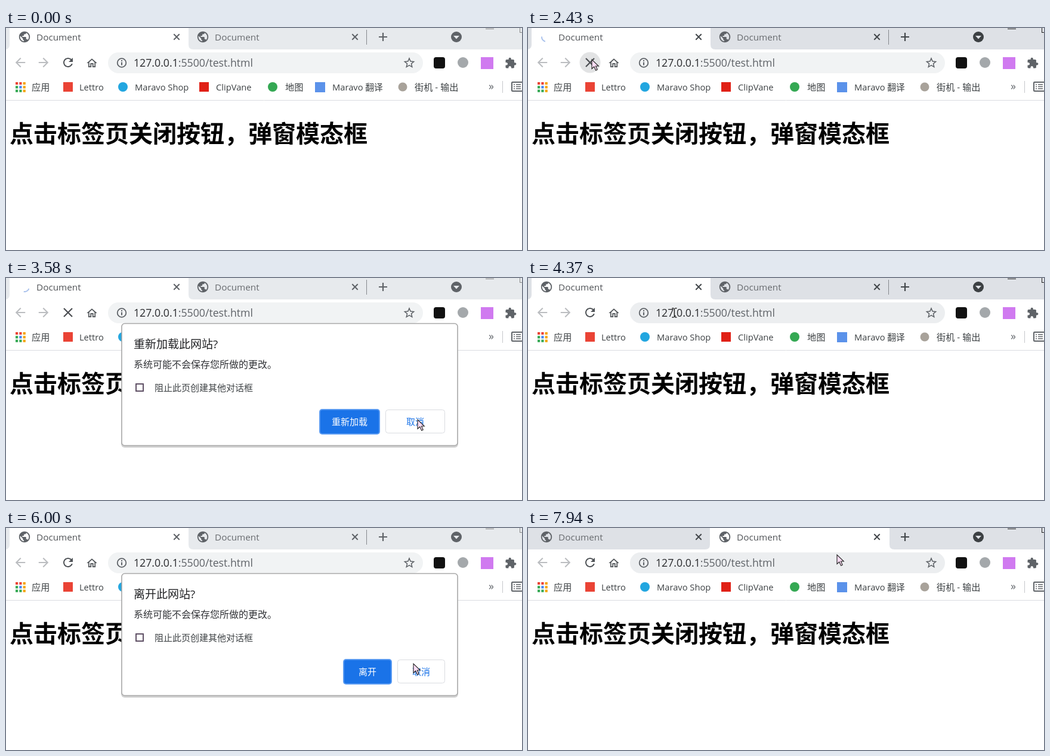
Animation, 865 px wide and 373 px high, one loop 8 s. Source, as an HTML page with a canvas:

```html
<!DOCTYPE html>
<html lang="zh-CN">
<head>
<meta charset="utf-8">
<style>
  html, body { margin: 0; width: 100%; height: 100%; overflow: hidden; background: #fff; }
  canvas { display: block; }
</style>
</head>
<body>
<canvas id="stage" width="865" height="373"></canvas>
<script>
const ctx = document.getElementById('stage').getContext('2d');
const LOOP = 8000;
const FONT = '"Open Sans", "Noto Sans CJK SC", "Noto Sans CJK", sans-serif';
const GREY = '#5f6368', BLUE = '#1a73e8';
const HEADING = '点击标签页关闭按钮\uff0c弹窗模态框';

// Icons on a 24-unit grid
const icons = {
  globe: 'M12 2C6.48 2 2 6.48 2 12s4.48 10 10 10 10-4.48 10-10S17.52 2 12 2zm-1 17.93c-3.95-.49-7-3.85-7-7.93 0-.62.08-1.21.21-1.79L9 15v1c0 1.1.9 2 2 2v1.93zm6.9-2.54c-.26-.81-1-1.39-1.9-1.39h-1v-3c0-.55-.45-1-1-1H8v-2h2c.55 0 1-.45 1-1V7h2c1.1 0 2-.9 2-2v-.41c2.93 1.19 5 4.06 5 7.41 0 2.08-.8 3.97-2.1 5.39z',
  arrow: 'M20 11H7.83l5.59-5.59L12 4l-8 8 8 8 1.41-1.41L7.83 13H20v-2z',
  reload: 'M17.65 6.35C16.2 4.9 14.21 4 12 4c-4.42 0-7.99 3.58-7.99 8s3.57 8 7.99 8c3.73 0 6.84-2.55 7.73-6h-2.08c-.82 2.33-3.04 4-5.65 4-3.31 0-6-2.69-6-6s2.69-6 6-6c1.66 0 3.14.69 4.22 1.78L13 11h7V4l-2.35 2.35z',
  home: 'M12 5.69l5 4.5V18h-2v-6H9v6H7v-7.81l5-4.5M12 3L2 12h3v8h6v-6h2v6h6v-8h3L12 3z',
  star: 'M22 9.24l-7.19-.62L12 2 9.19 8.63 2 9.24l5.46 4.73L5.82 21 12 17.27 18.18 21l-1.63-7.03L22 9.24zM12 15.4l-3.76 2.27 1-4.28-3.32-2.88 4.38-.38L12 6.1l1.71 4.04 4.38.38-3.32 2.88 1 4.28L12 15.4z',
  puzzle: 'M20.5 11H19V7c0-1.1-.9-2-2-2h-4V3.5C13 2.12 11.88 1 10.5 1S8 2.12 8 3.5V5H4c-1.1 0-1.99.9-1.99 2v3.8H3.5c1.49 0 2.7 1.21 2.7 2.7s-1.21 2.7-2.7 2.7H2V20c0 1.1.9 2 2 2h3.8v-1.5c0-1.49 1.21-2.7 2.7-2.7 1.49 0 2.7 1.21 2.7 2.7V22H17c1.1 0 2-.9 2-2v-4h1.5c1.38 0 2.5-1.12 2.5-2.5S21.88 11 20.5 11z',
  pointer: 'M0 0V15.5L3.8 12L6.7 18.2L9.2 17L6.5 11H11.3z'
};
for (const name in icons) icons[name] = new Path2D(icons[name]);

// Pointer path: time, x, y
const pointerPath = [
  [340, 562, 298], [760, 440, 110], [1100, 322, 14], [1340, 300, 30], [1640, 180, 64],
  [1960, 111, 55], [2030, 107, 53], [2820, 107, 53], [3280, 690, 238], [4120, 690, 238],
  [4370, 240, 50], [4620, 340, 28], [4930, 288, 12], [5400, 288, 12], [5720, 573, 213],
  [5930, 683, 228], [6500, 683, 228], [7240, 446, 20], [7740, 446, 20], [7940, 518, 45], [8000, 518, 45]
];

const bookmarks = [
  ['应用', 43], ['Lettro', 123], ['Maravo Shop', 216], ['ClipVane', 352],
  ['地图', 468], ['Maravo 翻译', 547], ['街机 - 输出', 685]
];

const clamp = v => Math.max(0, Math.min(1, v));
const ramp = (t, from, length) => clamp((t - from) / length);
const between = (v, a, b) => v >= a && v < b;

function pointerAt(t) {
  if (t < pointerPath[0][0]) return null;
  const i = pointerPath.findIndex(p => p[0] > t);
  const [t0, x0, y0] = pointerPath[i - 1], [t1, x1, y1] = pointerPath[i];
  const k = (t - t0) / (t1 - t0);
  return { x: x0 + (x1 - x0) * k, y: y0 + (y1 - y0) * k };
}

function text(str, x, y, size, color, weight = 400, align = 'left') {
  ctx.font = `${weight} ${size}px ${FONT}`;
  ctx.textAlign = align;
  ctx.fillStyle = color;
  ctx.fillText(str, x, y);
}
function rect(x, y, w, h, color, r = 0) {
  ctx.fillStyle = color;
  ctx.beginPath(); ctx.roundRect(x, y, w, h, r); ctx.fill();
}
function disc(x, y, r, color) {
  ctx.fillStyle = color;
  ctx.beginPath(); ctx.arc(x, y, r, 0, 7); ctx.fill();
}
function lines(color, width, ...segments) {
  ctx.strokeStyle = color; ctx.lineWidth = width;
  ctx.beginPath();
  for (const [x0, y0, x1, y1] of segments) { ctx.moveTo(x0, y0); ctx.lineTo(x1, y1); }
  ctx.stroke();
}
function box(x, y, w, h, r, color, width) {
  ctx.strokeStyle = color; ctx.lineWidth = width;
  ctx.beginPath(); ctx.roundRect(x, y, w, h, r); ctx.stroke();
}
function icon(name, x, y, scale, color, flip = 1) {
  ctx.save();
  ctx.translate(x, y); ctx.scale(scale * flip, scale); ctx.translate(-12, -12);
  ctx.fillStyle = color; ctx.fill(icons[name]);
  ctx.restore();
}
function cross(x, y, r, color, width = 2) {
  lines(color, width, [x - r, y - r, x + r, y + r], [x + r, y - r, x - r, y + r]);
}

function tabShape(x0, x1, color) {
  ctx.fillStyle = color;
  ctx.beginPath();
  ctx.moveTo(x0 - 8, 36); ctx.quadraticCurveTo(x0, 36, x0, 28);
  ctx.lineTo(x0, -2); ctx.lineTo(x1, -2); ctx.lineTo(x1, 28);
  ctx.quadraticCurveTo(x1, 36, x1 + 8, 36);
  ctx.fill();
}

function drawTabs(s) {
  const ink = s.focused ? '#43474b' : GREY;
  const strip = s.focused ? '#dee1e6' : '#e7eaed';
  rect(0, 0, 865, 36, strip);
  if (s.hoverTab === 1) tabShape(306, 605, '#f4f6f7');
  if (s.hoverTab === 0) tabShape(6, 306, '#f4f6f7');
  tabShape(...(s.tab ? [305, 606] : [6, 306]), '#fff');
  if (!s.tab && s.hoverTab !== 1) lines('#84878b', 1, [604.5, 3, 604.5, 28]);
  if (s.hoverClose) disc(286, 15, 10, '#bdc0c3');

  [0, 299].forEach((dx, i) => {
    if (i === 0 && s.loading) {
      const a = Math.PI + (s.t - 2740) * Math.PI * 2 / 1500;
      ctx.strokeStyle = '#a9c1ec'; ctx.lineWidth = 2;
      ctx.beginPath(); ctx.arc(31, 15, 8, a, a + 1.35); ctx.stroke();
    } else icon('globe', 31 + dx, 15, .92, GREY);
    text('Document', 51 + dx, 21, 15.3, i === s.tab ? '#505357' : '#686b6f');
    cross(286 + dx, 15, 4.7, ink);
  });

  lines(ink, 2.2, [625, 15, 639, 15], [632, 8, 632, 22]);
  disc(755, 15, 9, s.focused ? '#3c4043' : GREY);
  ctx.fillStyle = strip;
  ctx.beginPath(); ctx.moveTo(750, 13); ctx.lineTo(760, 13); ctx.lineTo(755, 18.5); ctx.fill();
  lines(s.focused ? '#222' : '#888', 1, [804, 1.5, 818, 1.5], [861.5, 0, 861.5, 8], [861, 7.5, 865, 7.5]);
}

function drawToolbar(s) {
  rect(0, 36, 865, 85, '#fff');
  icon('arrow', 24, 58, 1.03, '#bbbdc0');
  icon('arrow', 63, 58, 1.03, '#bbbdc0', -1);
  if (s.hoverReload) disc(104, 58, 17.5, '#e2e3e4');
  if (s.loading) cross(104, 58, 7, '#4b4e52', 2.2);
  else icon('reload', 104, 58, 1, '#505458');
  icon('home', 144, 59, .87, '#505458');

  rect(171, 41, 528, 35, s.hoverUrl ? '#eceef0' : '#f1f3f4', 17.5);
  ctx.strokeStyle = GREY; ctx.lineWidth = 1.8;
  ctx.beginPath(); ctx.arc(194, 58.5, 7.3, 0, 7); ctx.stroke();
  lines(GREY, 2, [194, 57.5, 194, 62.5], [194, 54, 194, 56]);
  text('127.0.0.1', 214, 65, 17.7, '#292a2d');
  text(':5500/test.html', 214 + ctx.measureText('127.0.0.1').width, 65, 17.7, GREY);
  icon('star', 676, 58.5, .95, GREY);

  rect(717, 49, 19, 19, '#111', 4);
  disc(766, 58, 9, '#a4a8ab');
  rect(796, 49, 21, 20, '#d07af0');
  icon('puzzle', 846, 59, .85, GREY);
}

function drawBookmarks() {
  const dots = ['#ea4335', '#ea4335', '#f4a300', '#34a853', '#4285f4', '#f4a300', '#34a853', '#34a853', '#f4a300'];
  dots.forEach((c, i) => rect(16 + i % 3 * 6.3, 91 + Math.floor(i / 3) * 6.3, 4.2, 4.2, c));
  rect(96, 91, 16, 16, '#ea4335');
  disc(196, 99, 8, '#22a6e0');
  rect(324, 91, 16, 16, '#e02016');
  disc(447, 99, 8, '#34a853');
  rect(518, 91, 17, 17, '#5b92ea');
  disc(665, 99, 7.5, '#a8a29a');
  for (const [label, x] of bookmarks) text(label, x, 105, /^[^a-z]+$/i.test(label) ? 15.2 : 14.7, '#3c4043');
  text('»', 809, 104, 18, GREY);
  lines('#c4c7ca', 1, [832.5, 89, 832.5, 109]);
  box(848, 91, 18, 15, 1, GREY, 2);
  for (const y of [95, 98.5, 102]) lines(GREY, 1.6, [851, y, 853, y], [855, y, 863, y]);
  lines('#dadce0', 1, [0, 121.5, 865, 121.5]);
}

function drawDialog(verb, alpha) {
  const wide = verb.length > 2 ? 100 : 80;
  const primary = 736 - wide * 2 - 10;
  const scale = .97 + .03 * alpha;
  ctx.save();
  ctx.globalAlpha = alpha;
  ctx.translate(475.5, 178.5); ctx.scale(scale, scale); ctx.translate(-475.5, -178.5);
  rect(193, 77, 565, 208, 'rgba(0,0,0,.18)', 6);
  rect(194, 76, 563, 206, '#fff', 5);
  box(194, 76.5, 563, 205, 5, '#a8a8a8', 1.5);
  text(verb + '此网站?', 214, 118, 19, '#202124');
  text('系统可能不会保存您所做的更改。', 214, 151, 16, '#303236');
  box(218, 178, 12, 12, 0, '#5f5065', 2);
  text('阻止此页创建其他对话框', 249, 190, 15, '#3c4043');
  rect(primary - 1, 220, wide + 2, 43, '#5a9bf2', 5);
  rect(primary + 1, 222, wide - 2, 39, BLUE, 3);
  text(verb, primary + wide / 2, 247, 15, '#fff', 500, 'center');
  box(736 - wide + .5, 221.5, wide - 1, 39, 4, '#dadce0', 1);
  text('取消', 736 - wide / 2, 247, 15, BLUE, 400, 'center');
  ctx.restore();
}

function drawPointer({ x, y }, beam) {
  ctx.save();
  ctx.translate(x, y);
  if (beam) {
    lines('#222', 1.5, [5, 1, 5, 16], [1, .8, 4, .8], [6, .8, 9, .8], [1, 16, 4, 16], [6, 16, 9, 16]);
  } else {
    ctx.fillStyle = '#fbdcf4'; ctx.fill(icons.pointer);
    ctx.strokeStyle = '#222'; ctx.lineWidth = 1.1; ctx.stroke(icons.pointer);
  }
  ctx.restore();
}

function draw(t) {
  const reloadAlpha = ramp(t, 2590, 170) * (1 - ramp(t, 3600, 160));
  const leaveAlpha = ramp(t, 5350, 170) * (1 - ramp(t, 6470, 160));
  const modal = reloadAlpha + leaveAlpha > 0;
  const p = pointerAt(t);
  const over = (x0, y0, x1, y1) => p && !modal && between(p.x, x0, x1) && between(p.y, y0, y1);
  const near = (x, y, r) => p && Math.hypot(p.x - x, p.y - y) < r;
  const s = {
    t,
    tab: t >= 7470 ? 1 : 0,
    focused: t >= 2430 && !modal,
    loading: between(t, 2430, 3700),
    hoverTab: over(296, 0, 605, 36) ? 1 : over(6, 0, 296, 36) ? 0 : -1,
    hoverClose: !modal && near(286, 15, 10),
    hoverReload: near(104, 58, 17.5),
    hoverUrl: over(171, 41, 699, 76)
  };
  if (s.hoverTab === s.tab) s.hoverTab = -1;

  rect(0, 0, 865, 373, '#fff');
  drawTabs(s);
  drawToolbar(s);
  drawBookmarks();
  text(HEADING, 6, 192, 40, '#000', 700);
  if (reloadAlpha) drawDialog('重新加载', reloadAlpha);
  if (leaveAlpha) drawDialog('离开', leaveAlpha);
  if (p) drawPointer(p, over(205, 48, 660, 70));
}

function frame() {
  draw(performance.now() % LOOP);
  requestAnimationFrame(frame);
}
frame();
</script>
</body>
</html>
```
